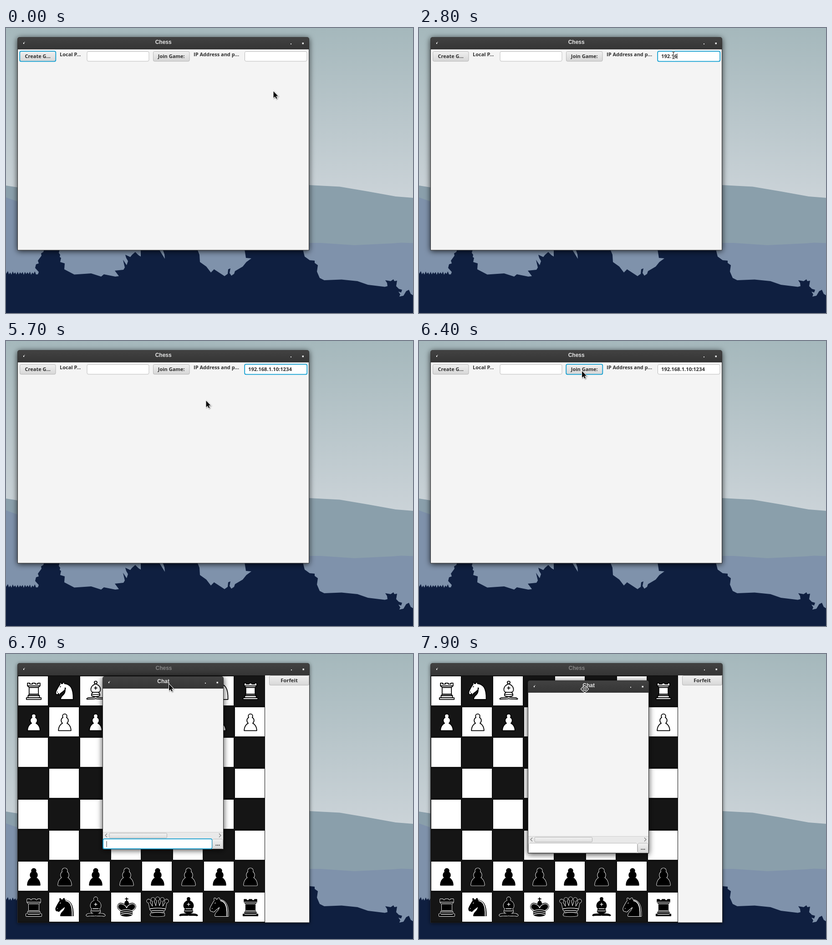
These frames come from a looping animation (894 px wide and 626 px high, 8 s). An HTML page with a canvas:

```html
<!DOCTYPE html>
<html lang="en">
<head>
<meta charset="utf-8">
<title>Chess</title>
<style>
html, body { margin: 0; width: 100%; height: 100%; overflow: hidden; background: #0f1f40; }
canvas { display: block; }
</style>
</head>
<body>
<canvas id="stage" width="894" height="626"></canvas>
<script>
const g = document.getElementById('stage').getContext('2d');
const LOOP = 8000, BLUE = '#139fd1', PANEL = '#f4f4f4';
const UI = '"Open Sans", "Noto Sans", sans-serif';
const TITLE = 'bold 12px "Liberation Sans", Arial, sans-serif';

// ---------- helpers ----------
function rect(x, y, w, h, color) {
  g.fillStyle = color;
  g.fillRect(x, y, w, h);
}
function round(x, y, w, h, r) {
  g.beginPath();
  g.roundRect(x, y, w, h, r);
}
function text(s, x, y, font, color = '#2d2d2d', align = 'left') {
  g.font = font;
  g.fillStyle = color;
  g.textAlign = align;
  g.fillText(s, x, y);
}
const bold = size => `bold ${size}px ${UI}`;
function shade(y0, y1, a, b) {
  const s = g.createLinearGradient(0, y0, 0, y1);
  s.addColorStop(0, a);
  s.addColorStop(1, b);
  return s;
}
function paint(path, fill, stroke, width) {
  if (fill) { g.fillStyle = fill; g.fill(path); }
  if (stroke) { g.strokeStyle = stroke; g.lineWidth = width; g.stroke(path); }
}

// ---------- landscape ----------
const farHill = new Path2D('M0 346L25 350L300 335L666 345L733 348.5L795 359L856 370L894 373V626H0Z');
const nearHill = new Path2D('M0 372L25 381L200 440L666 472H690L765 477L850 473L868 471.5L894 472.5V626H0Z');
const leftTrees = new Path2D('M64 542L70 541L72 536L64 527L66 519L72 517L70 511L78 500L77 495L82 492L84 486H118' +
  'L116 494L119 498L118 503L121 505L119 514L129 517L128 530L150 541.5L187 539L209 546L215 541L240 546L248 545' +
  'L239 533L258 531L261 526L257 509L265 521L268 512L264 505L262 498L273 503L277 498L284 492L291 499L296 502V486' +
  'H336L349 507L348 497L344 486H420L425 498L426 514L440 524L450 537L457 530L480 545V626H64Z');
const rightTrees = new Path2D('M480 545L487 540L488 530L493 528L491 538L495 544L501 540L503 534L520 524L528 514L539 506' +
  'L527 505L524 486H652L656 502L667 510L678 511L678 516L685 521L683 535L689 549L699 554L737 552.5L772 556L795 564' +
  'L832 568.5L838 567L837 560L833 554L845 556L851 552L853 556L859 555L857 567L863 573L870 575L868 581L862 579' +
  'L866 585L864 590L873 588L879 578L885 575L889 584L894 587V626H480Z');
const grass = new Path2D('M0 626V540');
for (let i = 0; i < 12; i++) {
  grass.lineTo(4 + i * 5.4, 534 + 3 * Math.abs(Math.sin(i * 1.7)));
  grass.lineTo(6.5 + i * 5.4, 541 + Math.sin(i * 2.3));
}
grass.lineTo(70, 542);
grass.lineTo(70, 626);

function landscape() {
  rect(0, 0, 894, 626, shade(0, 374, '#a5b8bc', '#cbd3d8'));
  paint(farHill, '#8a9fab');
  paint(nearHill, '#7f92ab');
  for (const p of [grass, leftTrees, rightTrees]) paint(p, '#0f1f40');
}

// ---------- widgets ----------
function frame(x, y, w, h, title, titleX, active, wide) {
  g.save();
  g.shadowColor = `rgba(0,0,0,${wide ? .75 : .6})`;
  g.shadowBlur = wide ? 13 : 8;
  g.shadowOffsetY = wide ? 2 : 1.5;
  round(x, y, w, h, [5, 5, 1, 1]);
  g.fillStyle = '#2c2c2c';
  g.fill();
  g.restore();
  round(x + .5, y + .5, w - 1, 26.5, [4, 4, 0, 0]);
  g.fillStyle = shade(y, y + 27, '#424242', '#353535');
  g.fill();
  rect(x + 1, y + 27, w - 2, h - 28, PANEL);
  text(title, titleX, y + 15, TITLE, active ? '#e4e4e4' : '#858585', 'center');
  rect(x + 13, y + 12, 2, 3, '#eee');
  rect(x + 15, y + 10.5, 1.5, 1.5, '#bbb');
  rect(x + w - 41, y + 14, 2, 2, '#e6e6e6');
  rect(x + w - 15.5, y + 12, 3.5, 3.5, '#e6e6e6');
}
function ring(x, y, w, h, focus) {
  const inset = focus ? .2 : .5;
  round(x + inset, y + inset, w - 2 * inset, h - 2 * inset, 3);
  g.strokeStyle = focus ? BLUE : '#b9b9b9';
  g.lineWidth = focus ? 1.8 : 1;
  g.stroke();
}
function button(x, y, w, h, label, focus, size = 11, base = 15) {
  round(x, y, w, h, 3);
  g.fillStyle = shade(y, y + h, '#f1f1f1', '#d6d6d6');
  g.fill();
  ring(x, y, w, h, focus);
  text(label, x + w / 2, y + base, bold(size), '#2d2d2d', 'center');
}
function field(x, y, w, h, focus) {
  round(x, y, w, h, 3);
  g.fillStyle = '#fff';
  g.fill();
  ring(x, y, w, h, focus);
}

// ---------- pieces, on a 45 unit square ----------
const art = {
  pawn: ['M22.5 9c-2.21 0-4 1.79-4 4 0 .89.29 1.71.78 2.38C17.33 16.5 16 18.59 16 21c0 2.03.94 3.84 2.41 5.03-3 1.06-7.41 5.55-7.41 13.47h23c0-7.92-4.41-12.41-7.41-13.47 1.47-1.19 2.41-3 2.41-5.03 0-2.41-1.33-4.5-3.28-5.62.49-.67.78-1.49.78-2.38 0-2.21-1.79-4-4-4z', ''],
  rook: ['M9 39h27v-3H9zM12 36v-4h21v4zM12.5 32l1.5-2.5h17l1.5 2.5zM14 29.5V17h17v12.5zM14 17l-3-3V9h4v2h5V9h5v2h5V9h4v5l-3 3z', 'M11 14h23M14 17h17M14 29.5h17M12.5 32h20M12 36h21'],
  knight: ['M22 10c10.5 1 16.5 8 16 29H15c0-9 10-6.5 8-21M24 18c.38 2.91-5.55 7.37-8 9-3 2-2.82 4.34-5 4-1.04-.94 1.41-3.04 0-3-1 0 .19 1.23-1 2-1 0-4 1-4-4 0-2 6-12 6-12s1.89-1.9 2-3.5c-.73-1-.5-2-.5-3 1-1 3 2.5 3 2.5h2s.78-2 2.5-3c1 0 1 3 1 3', 'M8.8 25.5h.5M14.2 16.2l.6-1'],
  bishop: ['M9 36c3.39-.97 10.11.43 13.5-2 3.39 2.43 10.11 1.03 13.5 2 0 0 1.65.54 3 2-.68.97-1.65.99-3 .5-3.39-.97-10.11.46-13.5-1-3.39 1.46-10.11.03-13.5 1-1.35.49-2.32.47-3-.5 1.35-1.94 3-2 3-2zM15 32c2.5 2.5 12.5 2.5 15 0 .5-1.5 0-2 0-2 0-2.5-2.5-4-2.5-4 5.5-1.5 6-11.5-5-15.5-11 4-10.5 14-5 15.5 0 0-2.5 1.5-2.5 4 0 0-.5.5 0 2zM25 8a2.5 2.5 0 1 1-5 0 2.5 2.5 0 1 1 5 0z', 'M17.5 26h10M15 30h15M22.5 15.5v5M20 18h5'],
  king: ['M22.5 25s4.5-7.5 3-10.5c0 0-1-2.5-3-2.5s-3 2.5-3 2.5c-1.5 3 3 10.5 3 10.5M11.5 37c5.5 3.5 15.5 3.5 21 0v-7s9-4.5 6-10.5c-4-6.5-13.5-3.5-16 4V27v-3.5c-3.5-7.5-13-10.5-16-4-3 6 5 10 5 10z', 'M11.5 30c5.5-3 15.5-3 21 0M11.5 33.5c5.5-3 15.5-3 21 0M11.5 37c5.5-3 15.5-3 21 0M32 29.5s8.5-4 6-9.65C34.15 14 25 18 22.5 24.5 20 18 9.9 14 7 19.85c-2.5 5.65 4.85 9 4.85 9'],
  queen: ['M9 26c8.5-1.5 21-1.5 27 0l2.5-12.5L31 25l-.3-14.1-5.2 13.6-3-14.5-3 14.5-5.2-13.6L14 25 6.5 13.5zM9 26c0 2 1.5 2 2.5 4 1 1.5 1 1 .5 3.5-1.5 1-1.5 2.5-1.5 2.5-1.5 1.5.5 2.5.5 2.5 6.5 1 16.5 1 23 0 0 0 1.5-1 0-2.5 0 0 .5-1.5-1-2.5-.5-2.5-.5-2 .5-3.5 1-2 2.5-2 2.5-4-8.5-1.5-18.5-1.5-27 0z', 'M9 26c8.5-1.5 18.5-1.5 27 0M11.5 30c3.5-1 18.5-1 22 0M12 33.5c6-1 15-1 21 0']
};
const pieces = {};
for (const k in art) pieces[k] = art[k].map(d => new Path2D(d));
for (const [x, y] of [[6, 12], [14, 9], [22.5, 8], [31, 9], [39, 12]]) {
  pieces.queen[0].moveTo(x + 2.4, y);
  pieces.queen[0].arc(x, y, 2.4, 0, 7);
}
const kingCross = new Path2D('M22.5 12V6M20 8h5');
const mane = new Path2D('M24.5 11.2c7 1.5 12.5 7 11.7 27.8');
const order = ['rook', 'knight', 'bishop', 'king', 'queen', 'bishop', 'knight', 'rook'];
const PITCH = 68, ROW = 67.9;

function piece(kind, white, col, row) {
  const [body, lines] = pieces[kind];
  g.save();
  g.translate(34 + col * PITCH, 53 + row * ROW);
  g.scale(1.2, 1.2);
  g.lineJoin = g.lineCap = 'round';
  if (!white) paint(body, null, '#fff', 3);
  if (kind === 'king') paint(kingCross, null, '#000', 1.6);
  paint(body, white ? '#fff' : '#000', '#000', 1.5);
  paint(lines, null, white ? '#000' : '#fff', white ? 1.4 : 1.1);
  if (kind === 'knight' && !white) paint(mane, null, '#fff', 1.6);
  g.restore();
}
function board() {
  rect(26, 47, 543, 543, '#101010');
  for (let row = 0; row < 8; row++) {
    for (let col = 0; col < 8; col++) {
      rect(27 + col * PITCH, Math.round(48.6 + row * ROW), 65, 64, (row + col) % 2 ? '#151515' : '#fff');
      if (row < 2 || row > 5) piece(row % 7 ? 'pawn' : order[col], row < 2, col, row);
    }
  }
}

// ---------- pointers ----------
const arrowShape = new Path2D('M0 0V14.5L3.4 11.4L5.8 16.6L8 15.6L5.7 10.4H10Z');
function arrow(x, y) {
  g.save();
  g.translate(x, y);
  g.save();
  g.shadowColor = 'rgba(0,0,0,.35)';
  g.shadowBlur = 2;
  g.shadowOffsetX = g.shadowOffsetY = 1;
  paint(arrowShape, '#fff', '#fff', 2);
  g.restore();
  paint(arrowShape, '#0a0a0a');
  g.restore();
}
const beamShape = new Path2D('M-3 -7.5H-1L0 -6.5L1 -7.5H3M0 -6.5V6.5M-3 7.5H-1L0 6.5L1 7.5H3');
function beam(x, y) {
  g.save();
  g.translate(x, y);
  paint(beamShape, null, 'rgba(255,255,255,.9)', 2.6);
  paint(beamShape, null, '#222', 1.1);
  g.restore();
}
const gripEdge = new Path2D('M0 -8L3.5 -4.5H5V-3.5L8.5 0L5 3.5V4.5H3.5L0 8L-3.5 4.5H-5V3.5L-8.5 0L-5 -3.5V-4.5H-3.5Z');
const gripPalm = new Path2D('M3.6 0A3.6 3.4 0 1 1 -3.6 0A3.6 3.4 0 1 1 3.6 0Z');
const gripDot = new Path2D('M1.2 0A1.2 1.2 0 1 1 -1.2 0A1.2 1.2 0 1 1 1.2 0Z');
function grip(x, y) {
  g.save();
  g.translate(x, y);
  paint(gripEdge, '#1a1a1a', '#fff', 1.2);
  paint(gripPalm, '#1a1a1a', '#fff', 1.3);
  paint(gripDot, '#fff');
  g.restore();
}

// ---------- timeline ----------
const track = [
  [100, 587.5, 139], [300, 574, 101], [400, 564, 74], [500, 559, 60], [5300, 559, 60],
  [5400, 548, 88], [5500, 514, 118], [5600, 476, 134], [5700, 439.5, 131], [5800, 402, 116],
  [5900, 365, 94], [6000, 337, 74], [6100, 346, 68], [6200, 358, 66], [7000, 358, 66],
  [7300, 337, 68], [7400, 337, 68], [7900, 364, 77]
];
function pointer(t) {
  const i = track.findIndex(k => k[0] >= t);
  if (i < 0) return track[track.length - 1].slice(1);
  if (i === 0) return track[0].slice(1);
  const [t0, x0, y0] = track[i - 1], [t1, x1, y1] = track[i];
  const f = (t - t0) / (t1 - t0);
  return [x0 + (x1 - x0) * f, y0 + (y1 - y0) * f];
}
const address = '192.168.1.10:1234';
const keys = [1600, 1700, 1900, 2100, 2200, 2800, 2900, 2900, 3100, 3300, 3500, 3600, 4000, 4500, 4700, 4900, 5200];

function lobby(t) {
  frame(25, 20, 641, 468.5, 'Chess', 345.7, true, t < 6600);
  const inField = t >= 800 && t < 6400;
  button(30, 51, 79.5, 22.5, 'Create G...', t < 800);
  text('Local P...', 118, 62, bold(11));
  field(177.5, 51, 137, 22.5, false);
  button(323, 51, 80.5, 22.5, 'Join Game:', t >= 6400);
  text('IP Address and p...', 412, 62, bold(11));
  field(524, 51, 137.5, 22.5, inField);
  const typed = address.slice(0, keys.filter(k => k <= t).length);
  text(typed, 532, 66, bold(11.2));
  const caret = t >= 900 && t < 1300 || t >= 1600 && t < 5700;
  if (caret) rect(532 + Math.round(g.measureText(typed).width) - .5, 56, 1, 12, '#222');
}
function chat(x, y, focus) {
  frame(x, y, 266, 380, 'Chat', x + 133.7, true, true);
  rect(x + 1, y + 342, 264, 15, '#e9e9e9');
  rect(x + 1, y + 342, 264, 1, '#d2d2d2');
  round(x + 15, y + 344.5, 126.5, 10.5, 2);
  g.fillStyle = shade(y + 344, y + 355, '#f3f3f3', '#dedede');
  g.fill();
  g.strokeStyle = '#b4b4b4';
  g.lineWidth = 1;
  g.stroke();
  const cy = y + 349.5;
  for (const [cx, d] of [[x + 6, 4], [x + 260, -4]]) {
    g.beginPath();
    g.moveTo(cx + d, cy - 4);
    g.lineTo(cx, cy);
    g.lineTo(cx + d, cy + 4);
    g.strokeStyle = '#777';
    g.lineWidth = 1.1;
    g.stroke();
  }
  field(x + 1, y + 357, 240, 22, focus);
  if (focus) rect(x + 8.5, y + 362, 1, 13, '#333');
  button(x + 241, y + 357, 24, 22, '...', false, 12);
}
function game(t) {
  frame(25, 20, 642, 570.5, 'Chess', 346.5, false, false);
  board();
  button(578, 47, 88, 22, 'Forfeit', false, 11.3);
  const f = Math.max(0, (t - 7400) / 500);
  chat(212 + 27 * f, 49 + 9 * f, t < 7400);
}
function draw(t) {
  g.clearRect(0, 0, 894, 626);
  landscape();
  (t < 6700 ? lobby : game)(t);
  const [x, y] = pointer(t);
  if (t >= 7400) grip(x, y);
  else if (t >= 500 && t < 5400) beam(x, y);
  else arrow(x, y);
}

const start = performance.now();
function tick(now) {
  const t = Math.max(0, now - start) % LOOP;
  draw(Math.floor(t / 100) * 100);
  requestAnimationFrame(tick);
}
draw(0);
requestAnimationFrame(tick);
</script>
</body>
</html>
```
